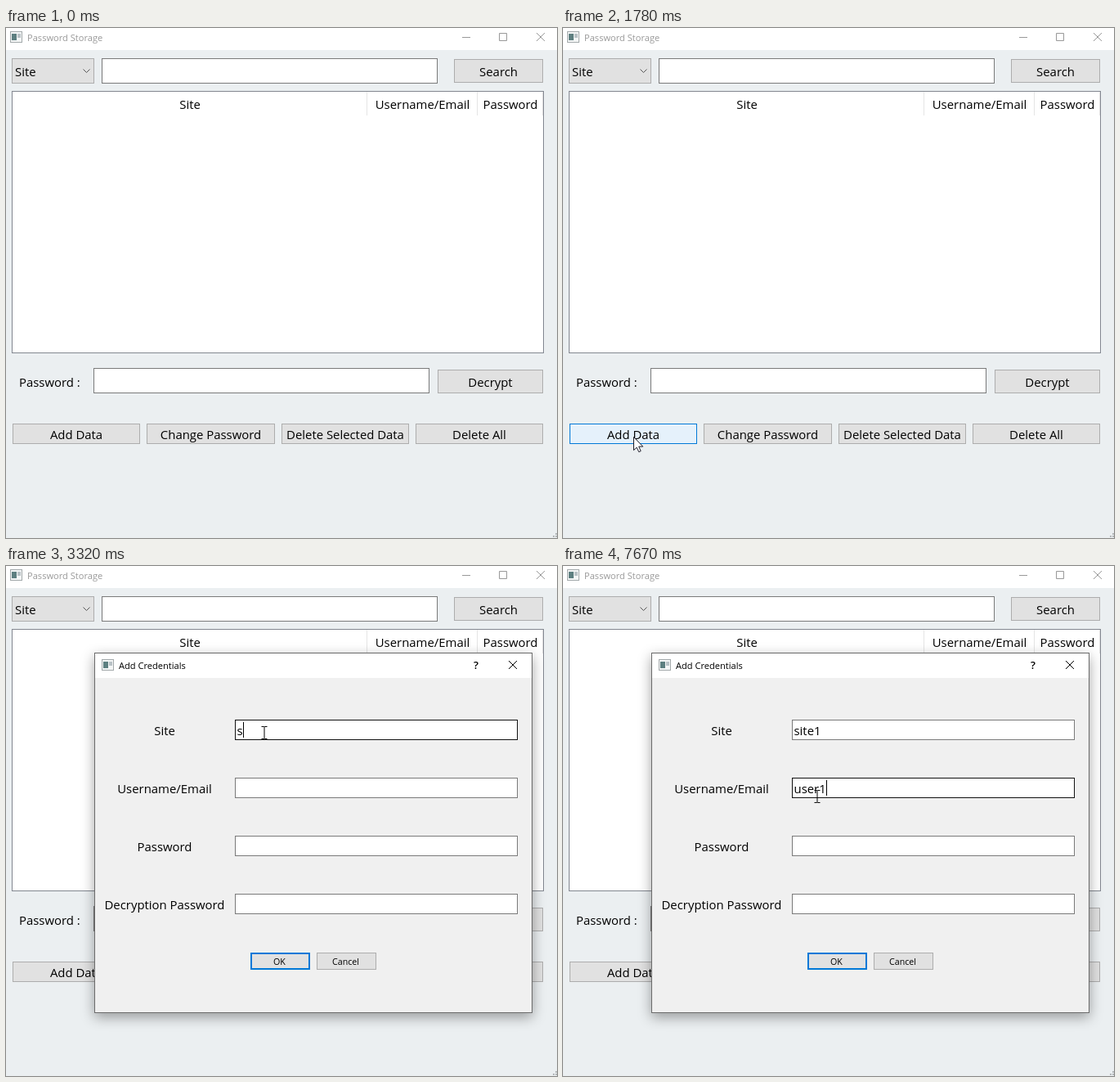
An HTML page for the animation above (8 s loop, 674 by 624 pixels).

```html
<!DOCTYPE html>
<html lang="en">
<head>
<meta charset="utf-8">
<title>Password Storage</title>
<style>
html, body { margin: 0; width: 100%; height: 100%; overflow: hidden; background: #ebeff1; }
svg { display: block; width: 674px; height: 624px; }
text { font: 14.9px "Open Sans", "Noto Sans", sans-serif; white-space: pre; }
text.small { font-size: 11.1px; }
text.mini { font-size: 10.7px; }
.mid { text-anchor: middle; }
.input { fill: #fff; stroke: #7a7a7a; }
.button { fill: #e1e1e1; stroke: #adadad; }
.hover { fill: #e5f1fb; stroke: #0078d7; }
.line { fill: none; stroke: currentColor; }
.shadow { filter: drop-shadow(0 5px 8px rgba(0, 0, 0, .36)); }
</style>
</head>
<body>
<svg id="stage" viewBox="0 0 674 624"></svg>
<script>
const LOOP = 8000, STEP = 77;
const FIELDS = [
  ["site", "Site", 188], ["user", "Username/Email", 259],
  ["pass", "Password", 330], ["decr", "Decryption Password", 401]
];

const box = (cls, l, t, r, b, extra = "") =>
  `<rect class="${cls}" x="${l + .5}" y="${t + .5}" width="${r - l - 1}" height="${b - t - 1}" ${extra}/>`;
const label = (x, y, str, cls = "mid") => `<text class="${cls}" x="${x}" y="${y}">${str}</text>`;
const button = (l, t, r, b, str, id) =>
  box("button", l, t, r, b) + (id ? box("hover", l, t, r, b, `id="${id}"`) : "") +
  label((l + r) / 2, (t + b) / 2 + 6.3, str);
const appIcon = (x, y) => `<g transform="translate(${x} ${y})">
  <rect x=".5" y=".5" width="14" height="13" fill="#f4f6f6" stroke="#a3a9ab"/>
  <rect x="2" y="3" width="6" height="8" fill="#5d7f80"/>
  <rect x="9" y="3" width="4" height="5" fill="#b9c2c6"/></g>`;
const cross = (x, y) => `<path class="line" d="M${x} ${y}l10 10m0-10l-10 10"/>`;

const mainWindow = `
  <rect width="674" height="624" fill="#ebeff1"/>
  <rect width="674" height="27" fill="#fff"/>
  <g id="bar">${appIcon(5, 4)}
    <text class="small" x="26" y="16" fill="currentColor">Password Storage</text>
    <path class="line" d="M558 11.5h10M603.5 6.5h9v9h-9z"/>${cross(649, 6)}</g>
  ${box("button", 7, 37, 108, 68)}${label(11, 59, "Site", "")}
  <path class="line" color="#555" d="M94.5 50.5l4 4 4-4"/>
  ${box("input", 117, 37, 528, 68)}
  ${button(548, 38, 657, 67, "Search")}
  ${box("input", 7, 77, 658, 398, 'style="stroke:#828790"')}
  <path class="line" color="#e5e5e5" d="M441.5 78v29M576.5 78v29M656.5 78v29"/>
  ${label(225, 99, "Site")}${label(509.5, 99, "Username/Email")}${label(617, 99, "Password")}
  ${label(16, 439, "Password :", "")}
  ${box("input", 107, 416, 518, 447)}
  ${button(528, 418, 657, 447, "Decrypt")}
  ${button(8, 484, 164, 509, "Add Data", "addHover")}
  ${button(172, 484, 329, 509, "Change Password")}
  ${button(337, 484, 493, 509, "Delete Selected Data")}
  ${button(501, 484, 657, 509, "Delete All", "allHover")}
  <path fill="#b4b8ba" d="M672 618h2v2h-2zM672 621h2v2h-2zM669 621h2v2h-2z"/>`;

const field = ([id, name, y]) => label(194, y + 19, name) +
  box("input", 280, y, 626, y + 25, `id="${id}Box"`) +
  `<text id="${id}Text" x="282.5" y="${y + 19}"></text>
   <path id="${id}Caret" class="line" d="M0 ${y + 3}v19"/>`;

const dialog = `<g id="dialog">
  ${box("shadow", 108, 106, 644, 547, 'fill="#f0f0f0" stroke="#6b6b6b"')}
  <rect x="109" y="107" width="534" height="30" fill="#fff"/>
  ${appIcon(117, 114)}${label(138, 126, "Add Credentials", "small")}
  <text class="small mid" x="575" y="126" style="font-size:13px;font-weight:600">?</text>${cross(615, 116)}
  ${FIELDS.map(field).join("")}
  <rect x="300" y="474" width="71" height="19" fill="#e1e1e1" stroke="#0078d7" stroke-width="2"/>
  ${label(334.5, 488, "OK", "mini mid")}
  ${box("button", 380, 473, 453, 494)}${label(415.5, 488, "Cancel", "mini mid")}</g>`;

const pointer = `<g id="cursor">
  <circle id="click" cx="-2" r="12" fill="#ff0" opacity=".55"/>
  <path id="arrow" fill="#fff" stroke="#1c1c28" d="M.5.5V16.6L4.2 13.2 6.8 18.7 9.2 17.6 6.7 12.1H11.8z"/>
  <path id="beam" class="line" d="M-3.5-7.5h3l.5.5.5-.5h3M0-7V7M-3.5 7.5h3l.5-.5.5.5h3"/></g>`;

document.getElementById("stage").innerHTML = mainWindow + dialog + pointer;
const el = id => document.getElementById(id);
const show = (id, on) => { el(id).style.display = on ? "" : "none"; };
const within = (t, ...spans) => spans.some(([a, b]) => t >= a && t < b);

// Keys are [time, ...values]; linear in between, held at both ends.
function track(keys, t) {
  const i = keys.findIndex(k => k[0] > t);
  if (i === 0) return keys[0].slice(1);
  if (i < 0) return keys[keys.length - 1].slice(1);
  const a = keys[i - 1], b = keys[i], p = (t - a[0]) / (b[0] - a[0]);
  return a.slice(1).map((v, n) => v + (b[n + 1] - v) * p);
}

const PATH = [
  [460, 668, 482], [768, 646, 467], [922, 646, 467], [1076, 575, 488], [1161, 545, 500],
  [1230, 420, 527], [1307, 128, 528], [1384, 81, 527], [1461, 80, 512], [1538, 84, 500],
  [1769, 86, 500], [1846, 234, 578], [1923, 436, 529], [2077, 432, 430], [2308, 350, 270],
  [2462, 318, 208], [2539, 316, 204], [5803, 316, 204], [5880, 316, 210],
  [5957, 314, 234], [6034, 311, 270], [6111, 311, 282]
];
const ADD_HOVER = [[1384, 0], [1538, 1], [1769, 1], [1923, .35], [2077, 0]];
const ALL_HOVER = [[999, 0], [1076, .8], [1161, 1], [1384, .35], [1538, 0]];
const TYPED = {
  site: ["site1", [3320, 3550, 3630, 3710, 4320]],
  user: ["user1", [7040, 7210, 7280, 7360, 7670]]
};
const CARETS = {
  site: [[2539, 3000], [3320, 4720]],
  user: [[1769, 2539], [6111, 6740], [7040, LOOP]],
  pass: [],
  decr: [[4720, 5330], [5880, 6111]]
};

// The screen refreshes in steps of 77 ms.
function snap(t) {
  const base = t < 5000 ? 460 : 5880;
  return base + Math.floor((t - base) / STEP + .1) * STEP;
}

function borderOf(id, hovered, t) {
  if (hovered) return "#111";
  if (id === "site" && within(t, [5950, 6420])) return "#454545";
  const focused = id === "user" && t < 2539 || id === "decr" && within(t, [4720, 6111]);
  return focused ? "#0078d7" : "#7a7a7a";
}

function draw(t) {
  const q = snap(t), [x, y] = track(PATH, q);
  el("bar").style.color = within(q, [768, 1769]) ? "#000" : "#999";
  el("bar").firstElementChild.style.opacity = 1;
  el("addHover").style.opacity = track(ADD_HOVER, q)[0];
  el("allHover").style.opacity = track(ALL_HOVER, q)[0];

  const open = Math.min(1, Math.max(0, (q - 1783) / 230));
  const size = 1 - .12 * (1 - open) ** 3;
  show("dialog", open > 0);
  el("dialog").setAttribute("opacity", 1 - (1 - open) ** 2);
  el("dialog").setAttribute("transform",
    `translate(376 326.5) scale(${size}) translate(-376 -326.5)`);

  let overField = false;
  for (const [id, , top] of FIELDS) {
    const hovered = open === 1 && x > 280 && x < 626 && y >= top && y < top + 25;
    overField ||= hovered;
    el(id + "Box").style.stroke = borderOf(id, hovered, q > t ? q : t);
    const [word, times] = TYPED[id] || ["", []];
    const text = el(id + "Text");
    text.textContent = word.slice(0, times.filter(k => t >= k).length);
    const on = within(t, ...CARETS[id]);
    show(id + "Caret", on);
    if (on) {
      const width = text.textContent ? text.getComputedTextLength() : 0;
      el(id + "Caret").setAttribute("transform", `translate(${Math.floor(283 + width) + .5} 0)`);
    }
  }

  show("cursor", q >= 460);
  el("cursor").setAttribute("transform", `translate(${Math.round(x)} ${Math.round(y)})`);
  show("click", within(q, [768, 999], [1615, 1769], [2539, 2616], [6111, 6265]));
  show("arrow", !overField);
  show("beam", overField);
}

const start = performance.now();
function tick() {
  draw((performance.now() - start) % LOOP);
  requestAnimationFrame(tick);
}
tick();
</script>
</body>
</html>
```
